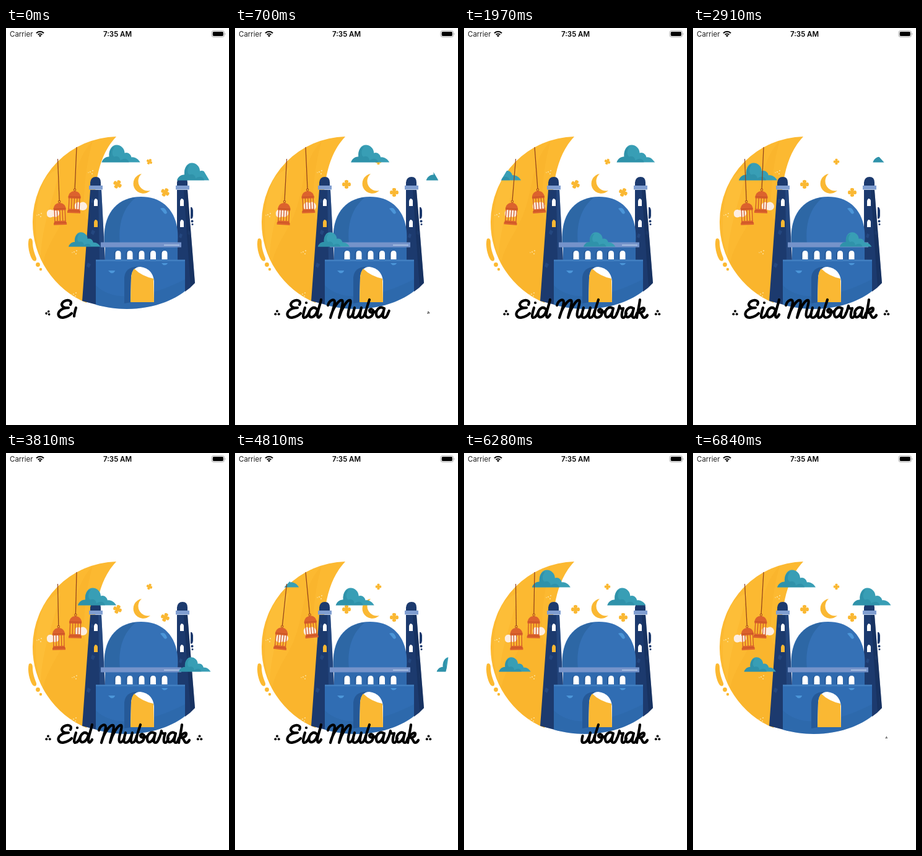
These frames come from a looping animation (360x640 px, 6930 ms). An HTML page:

```html
<!DOCTYPE html>
<html lang="en">
<head>
<meta charset="utf-8">
<title>Eid Mubarak</title>
<style>
  html, body { margin: 0; width: 100%; height: 100%; overflow: hidden; background: #fff; }
  svg { display: block; width: 100vw; height: 100vh; }
  text { font-family: Inter, sans-serif; font-size: 11.5px; }
</style>
</head>
<body>
<svg viewBox="0 0 360 640">
  <defs>
    <clipPath id="sky"><circle cx="194" cy="315" r="151"/></clipPath>
    <g id="cloud">
      <path fill="#389eb5" d="M0 0C2-6 7-9 12-9C11-21 17-28 24-28S37-22 37-15C42-17 47-13 48-8C54-9 59-5 62 0Z"/>
      <path fill="#2a8ba3" opacity=".6" d="M0 0C2-6 7-9 12-9C11-19 16-25 21-25C15-18 17-11 20-9C27-12 30-6 30-3C36-8 43-6 44 0Z"/>
    </g>
    <g id="lantern">
      <circle r="1.7" fill="none" stroke="#a8461d"/>
      <path fill="#dc622d" d="M-10 11C-9 5-5 2 0 2S9 5 10 11V14H-10Z"/>
      <path fill="none" stroke="#cf5828" stroke-width="1.3" d="M-8.5 13V32M-4.3 13V32M0 13V32M4.3 13V32M8.5 13V32"/>
      <path fill="#dc622d" d="M-9.5 31H9.5V34H10.5V37.5H-10.5V34H-9.5Z"/>
      <path stroke="#b8481f" opacity=".7" d="M-10 11.5H10M-10 34H10"/>
    </g>
    <path id="star" d="M0-7C4-7 3.4-4 2.2-2.2C4-3.4 7-4 7 0S4 3.4 2.2 2.2C3.4 4 4 7 0 7S-3.4 4-2.2 2.2C-4 3.4-7 4-7 0S-4-3.4-2.2-2.2C-3.4-4-4-7 0-7Z"/>
    <path id="slit" d="M-3 6V-2Q-2-6 0-6Q3-5 3-2V6Z"/>
    <path id="arch" d="M-4.5 7V-2Q-4.5-7 0-7T4.5-2V7Z"/>
    <g id="specks" fill="#fde09a"><circle r="1"/><circle cx="4" cy="-2" r="1"/><circle cx="3" cy="3" r="1"/><circle cx="-3" cy="1" r=".8"/></g>
    <g id="dots"><circle cy="-2.4" r="2"/><circle cx="-2.7" cy="2.2" r="2"/><circle cx="2.7" cy="2.2" r="2"/></g>
  </defs>

  <text x="6" y="14" fill="#222">Carrier</text>
  <text x="180" y="14" text-anchor="middle" font-weight="600">7:35 AM</text>
  <path fill="none" stroke="#000" stroke-width="2" d="M49 8.2A8.6 8.6 0 0 1 61 8.2M51.6 10.8A5 5 0 0 1 58.4 10.8"/>
  <path d="M55 14.6L52.9 12.4A3 3 0 0 1 57.1 12.4Z"/>
  <rect x="332" y="4.5" width="20.5" height="10" rx="3" fill="none" stroke="#aaa"/>
  <rect x="333.7" y="6.1" width="17.2" height="6.8" rx="1.6"/>
  <path fill="#aaa" d="M353.5 7.7Q355.5 9.5 353.5 11.3Z"/>

  <!-- Large moon -->
  <path fill="#fcb931" d="M178 175C152 203 144 240 141 300L130 443A140 140 0 0 1 43 312A138 138 0 0 1 178 175Z"/>
  <path fill="#eda21c" opacity=".18" d="M140 182C108 215 112 260 96 300C86 326 66 350 60 378C75 407 98 430 130 443L141 300C120 340 122 240 140 182Z"/>
  <path fill="#ffc94d" opacity=".25" d="M62 244C46 280 43 330 56 370C58 320 72 290 88 225Q74 230 62 244Z"/>
  <use href="#specks" x="136" y="232"/><use href="#specks" x="53" y="301"/>
  <use href="#specks" x="110" y="361"/><use href="#specks" x="109" y="429"/>
  <g fill="#fcb931">
    <path d="M37 340C41 338 43 341 43 346C43 355 46 363 49 371C50 376 46 377 43 374C38 367 34 350 37 340Z"/>
    <circle cx="51.5" cy="381.5" r="3.4"/><circle cx="56" cy="389" r="2.2"/>
  </g>
  <g fill="#fdeee2">
    <path d="M66 300C65 294 71 291 75 294C78 290 84 292 86 297C87 304 80 306 76 304C71 307 66 305 66 300Z"/>
    <path d="M111 288C110 282 116 279 120 282C124 279 130 281 131 287C131 294 124 295 120 293C116 296 111 293 111 288Z"/>
  </g>

  <g fill="#fab833">
    <path d="M219 235A16 16 0 1 0 233 262A15.6 15.6 0 0 1 219 235Z"/>
    <g id="stars"></g>
  </g>

  <!-- Minarets -->
  <g fill="#1c3a6e">
    <path d="M136 255V249Q137 240 145 240T153 249V255ZM136 261H154L160 376H146V446L123 440Z"/>
    <path d="M276 255V249Q277 240 285 240T293 249V255ZM276 261H293L305 411Q298 419 289 425V374H276Z"/>
    <path d="M298 289Q301 288 302 294V303Q301 309 298 307Z"/>
    <circle cx="300.5" cy="311.5" r="2"/><circle cx="301" cy="316.5" r="1.5"/>
  </g>
  <path fill="#2c5590" opacity=".5" d="M149 261H154L160 376H151ZM139 325l5 3-3 6-4-3ZM132 378l5 3-3 6-4-3ZM281 331l4 2-2 6-4-2ZM294 326l4 3-1 5-4-2ZM138 275l3 2-1 5-3-1Z"/>
  <path fill="#132b55" opacity=".5" d="M287 261H293L305 411L298 417Z"/>
  <path fill="#7f9dd0" d="M134 254H156V260.5H134ZM274 254H296V260.5H274Z"/>
  <g fill="#fff"><use href="#slit" x="145" y="281"/><use href="#slit" x="284" y="281"/><use href="#slit" x="284" y="315"/></g>
  <use href="#slit" x="145" y="315" fill="#fab833"/>

  <!-- Mosque -->
  <path fill="#3571b6" d="M159 347C155 300 179 272 218 272S281 300 277 347Z"/>
  <path fill="#2a639f" opacity=".7" d="M159 347C156 304 177 276 210 273C188 290 181 318 184 347Z"/>
  <path fill="#4b95d8" d="M249 291Q257 287 260 298Q257 302 254 297Z"/>
  <path fill="#2f69ad" d="M160 353H277V375H160Z"/>
  <path fill="#306db3" d="M145 374H289V424C262 446 205 463 145 446Z"/>
  <path fill="#4280c2" d="M145 373.5H289V376H145Z"/>
  <path fill="#2a639f" opacity=".35" d="M145 415C170 440 220 440 289 405V424C262 446 205 463 145 446Z"/>
  <path fill="#7593ca" d="M153 345.5H283V353.5H153Z"/>
  <path fill="#a5bce0" d="M255 349h25v2h-25Z"/>
  <path fill="#4b95d8" d="M165 391H176Q175 396 169 395ZM251 379h10q-2 4-7 3Z"/>
  <path fill="#255998" d="M191 444V402Q193 385 212 385L203 442Z"/>
  <g id="gallery"></g>
  <path fill="#fff" d="M201 442L202 402Q204 385 217 385Q237 388 239 408V442Z"/>
  <path fill="#fab833" d="M201 442L202 402Q203 392 207 388Q219 400 238 404L239 442Z"/>

  <g id="clouds" clip-path="url(#sky)"></g>
  <g id="lanterns"></g>
  <g id="greeting" fill="none" stroke="#000" stroke-width="4.2" stroke-linecap="round" stroke-linejoin="round"></g>
  <use href="#dots" id="dotsLeft"/>
  <use href="#dots" id="dotsRight"/>
</svg>
<script>
const LOOP = 6930, SWING = 3620, DRIFT = 0.0467, TRAVEL = 338, EXIT = 335;
const $ = id => document.getElementById(id);
const clamp = (v, max = 1) => Math.min(max, Math.max(0, v));
const ramp = (t, from, to) => clamp((t - from) / (to - from));

function add(parent, tag, attrs) {
  const node = document.createElementNS('http://www.w3.org/2000/svg', tag);
  for (const key in attrs) node.setAttribute(key, attrs[key]);
  return parent.appendChild(node);
}

for (const x of [181, 200, 219, 237.5, 256]) {
  add($('gallery'), 'use', { href: '#arch', x: x - 2, y: 366, fill: '#255998' });
  add($('gallery'), 'use', { href: '#arch', x, y: 366, fill: '#fff' });
}

const stars = [[180, 252, 1], [257, 265, 1], [231.5, 215.5, 0.68]].map(([x, y, scale]) =>
  ({ x, y, scale, node: add($('stars'), 'use', { href: '#star' }) }));

const clouds = [[154.5, 216.5, 1], [276, 245.5, 1], [101, 352.5, 0.83]].map(([x, y, scale]) =>
  ({ x, y, scale, node: add($('clouds'), 'use', { href: '#cloud' }) }));

const lanterns = [
  { x: 83.5, y: 211, length: 69, rest: -2, reach: 5.8 },
  { x: 114, y: 192, length: 69, rest: 1.6, reach: -5.6 }
];
for (const l of lanterns) {
  l.node = add($('lanterns'), 'g', {});
  add(l.node, 'path', { d: `M0 0V${l.length - 1.5}`, stroke: '#8f3f1a', 'stroke-width': 1.2 });
  add(l.node, 'use', { href: '#lantern', y: l.length });
}

// Pen strokes of the lettering, in writing order.
let inkTotal = 0;
const strokes = [
  'M104 446C108 439 99 437 93 441C87 446 91 452 101 451C90 451 84 457 84.500 462C86 470 99 467 106 460',
  'M113 451C111 458 108 467 112 467C116 467 118 462 120 458',
  'M115 443h.1',
  'M132 453C126 447 119 455 119.500 462C121 470 130 466 133 455',
  'M139 438C137 448 132 459 133 464C134 469 137 466 139 462',
  'M150 447C152 439 161 435 161 442C160 451 156 460 154 467C157 454 167 437 173 439C176 442 170 457 168 467C172 453 181 437 186 439C189 442 180 460 183 465C185 469 189 464 191 460',
  'M193 451C191 458 188 467 193 467C198 467 202 459 204 451C202 459 200 467 204 467C208 467 210 460 211 456',
  'M217 438C214 448 209 459 211 464C213 469 222 467 223 459C224 453 219 452 217 455C217 459 223 460 227 457',
  'M240 452C234 447 227 455 228 462C229 470 238 466 241 452C239 460 237 467 241 467C244 467 246 463 247 460',
  'M247 460C249 456 250 452 251 448C251 452 254 453 257 452C255 458 253 467 257 467C260 467 261 463 262 460',
  'M273 452C267 447 260 455 261 462C262 470 271 466 274 452C272 460 270 467 274 467C277 467 278 463 279 460',
  'M284 438C283 448 280 458 279 467',
  'M280 460C284 452 291 449 291 453C291 458 285 459 283 459C288 459 287 467 291 467C294 467 295 465 296 463'
].map(d => {
  const node = add($('greeting'), 'path', { d });
  const length = node.getTotalLength(), start = inkTotal;
  inkTotal += length;
  return { node, length, start };
});

function writeGreeting(t) {
  const head = ramp(t, -140, 970) * inkTotal;
  const tail = ramp(t, 5740, 6842) * inkTotal;
  for (const { node, length, start } of strokes) {
    const from = clamp(tail - start, length), to = clamp(head - start, length);
    node.style.display = to > from ? '' : 'none';
    node.setAttribute('stroke-dasharray', `${to - from + 0.01} 999`);
    node.setAttribute('stroke-dashoffset', -from);
  }
}

function place(node, x, y, scale, angle = 0) {
  node.setAttribute('transform', `translate(${x} ${y}) rotate(${angle}) scale(${scale})`);
}

// The dots turn half a circle while they grow.
const placeDots = (id, x, grown) => place($(id), x, 459, grown, 180 * (1 - grown));

function draw(t) {
  for (const c of clouds) {
    const x = c.x + DRIFT * t;
    place(c.node, x > EXIT ? x - TRAVEL : x, c.y, c.scale);
  }
  const swing = Math.cos(2 * Math.PI * (t - 3260) / SWING);
  for (const l of lanterns) {
    const sway = l.rest + l.reach * swing;
    place(l.node, l.x, l.y, 1, -Math.asin(sway / l.length) * 180 / Math.PI);
  }
  const twist = 32 * Math.max(0, Math.cos(4 * Math.PI * (t - 50) / SWING)) ** 3;
  for (const s of stars) place(s.node, s.x, s.y, s.scale, twist);

  writeGreeting(t);
  placeDots('dotsLeft', 68, ramp(t, -400, 50) * (1 - ramp(t, 5740, 6200)));
  placeDots('dotsRight', 312.5, ramp(t, 500, 1000) * (1 - ramp(t, 6500, 7020)));
}

function frame() {
  draw(performance.now() % LOOP);
  requestAnimationFrame(frame);
}
frame();
</script>
</body>
</html>
```
